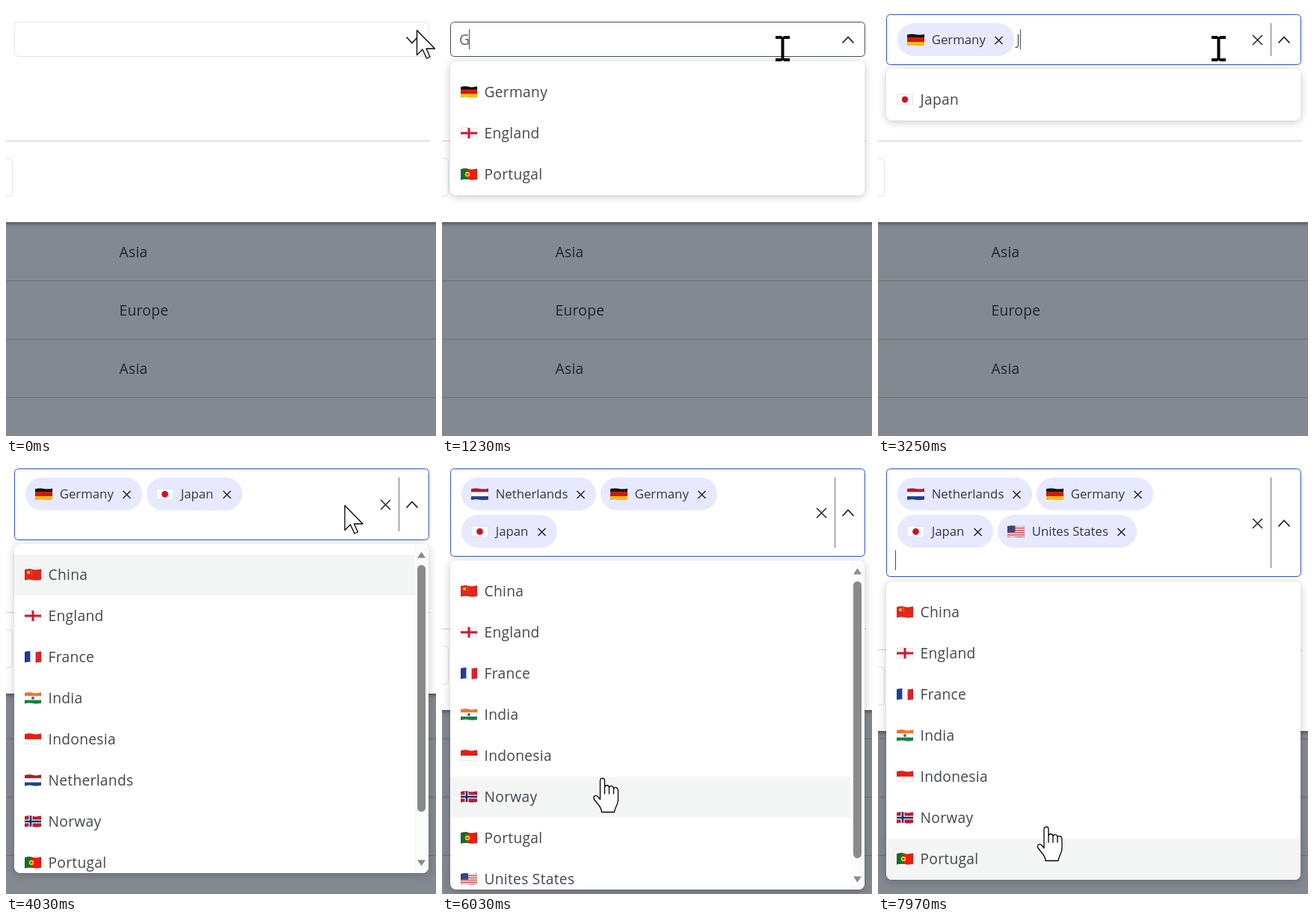
Write an HTML page that moves like this. It is 575x575 px and loops after 8000 ms.

```html
<!DOCTYPE html>
<html lang="en">
<head>
<meta charset="utf-8">
<title>Country multi-select</title>
<style>
  html, body { margin: 0; width: 100%; height: 100%; overflow: hidden; background: #848890; }
  svg { display: block; }
  text { font: 19.2px "Open Sans", sans-serif; letter-spacing: .3px; fill: #434651; }
  .page text { fill: #20242d; }
  .chip text { font-size: 16.8px; letter-spacing: 0; fill: #34353f; }
  text.typed { letter-spacing: 0; fill: #5c606d; }
  .modal { filter: drop-shadow(0 1px 3px rgba(0, 0, 0, .55)); }
  .menu { filter: drop-shadow(0 2px 6px rgba(0, 0, 0, .22)); }
  .icon { fill: none; stroke: #20222a; stroke-width: 1.5; }
  .pointer { fill: #fff; stroke: #000; stroke-width: 1.3; stroke-linejoin: round; }
</style>
</head>
<body>
<svg id="stage" viewBox="0 0 575 575" width="100%" height="100%">
  <defs id="flags"></defs>
  <g class="page" id="page"></g>
  <g id="view"></g>
  <rect id="caret" width="1" height="27" fill="#4a4d58"/>
  <g id="cursor">
    <path id="arrow" class="pointer" d="M.5 .5V33.5L8 26L13.5 38L18 36L13 25H24.5Z"/>
    <path id="beam" d="M-9.5 -17H-2L0 -15.5L2 -17H9.5V-13H2V13H9.5V17H2L0 15.5L-2 17H-9.5V13H-2V-13H-9.5Z"/>
    <path id="hand" class="pointer" d="M-3 28V3C-3 -1.5 3 -1.5 3 3V13C3 8 9 8 9 13C9 9 15 9 15 14.5C15 11 21 11 21 17V28C21 36 17 37 16 45H-1C-1 38 -6 35 -11 28C-13 24 -9 21 -6 24.5ZM3 12V21M9 13V21M15 14V21"/>
  </g>
</svg>
<script>
const LOOP = 8000, ROW = 55, PAD = 14, MAX_MENU = 440;
const $ = id => document.getElementById(id);
const rect = (x, y, w, h, fill, more = '') =>
  `<rect x="${x}" y="${y}" width="${w}" height="${h}" fill="${fill}" ${more}/>`;
const line = (x1, y1, x2, y2, color) =>
  `<path d="M${x1} ${y1}L${x2} ${y2}" stroke="${color}" fill="none"/>`;
const text = (x, y, s, cls = '') => `<text class="${cls}" x="${x}" y="${y}">${s}</text>`;
const dot = (x, y, r, fill) => `<circle cx="${x}" cy="${y}" r="${r}" fill="${fill}"/>`;
const cross = (x, y, r) =>
  `<path class="icon" d="M${x - r} ${y - r}l${2 * r} ${2 * r}m0 ${-2 * r}l${-2 * r} ${2 * r}"/>`;

// Flags on a 22 x 16 cloth
const bands = (...colors) => colors.map((c, i) =>
  rect(0, i * 16 / colors.length, 22, 16 / colors.length + .1, c)).join('');
const nordic = (color, w) => rect(8 - w / 2, 0, w, 16, color) + rect(0, 8 - w / 2, 22, w, color);
const stripes = Array.from({ length: 11 }, (_, i) => i % 2 ? '#f4f0f0' : '#cf3a45');
const flags = {
  China: bands('#e5251d') + dot(5, 5, 2, '#fbd022') + dot(9, 3, .7, '#fbd022') + dot(9.5, 7, .7, '#fbd022'),
  England: bands('#fafafa') + rect(9.5, 0, 3, 16, '#cf1730') + rect(0, 6.5, 22, 3, '#cf1730'),
  France: bands('#fafafa') + rect(0, 0, 7.4, 16, '#1f3d99') + rect(14.6, 0, 8, 16, '#e01e28'),
  Germany: bands('#15120f', '#d8150c', '#fcbc0a'),
  India: bands('#f2762b', '#fafafa', '#15833c') + dot(11, 8, 2, '#5a5f96'),
  Indonesia: bands('#e81e16', '#fafafa'),
  Japan: bands('#fafafa') + dot(11, 8, 4.2, '#d30c25'),
  Netherlands: bands('#b01c2b', '#fafafa', '#22418c'),
  Norway: bands('#c21930') + nordic('#fafafa', 5) + nordic('#15306b', 2.5),
  Portugal: bands('#e81e10') + rect(0, 0, 9, 16, '#10702c') + dot(9, 8, 3.2, '#f7d21e') + dot(9, 8, 1.6, '#d8281c'),
  'Unites States': bands(...stripes) + rect(0, 0, 10, 8.7, '#3c4478')
};
const countries = Object.keys(flags);
const cloth = 'M0 1.2Q6 -.3 11 .9T22 .6V14.8Q16 16.2 11 15T0 15.4Z';
const flagId = name => 'flag-' + countries.indexOf(name);
const flag = (name, x, y, w) =>
  `<use href="#${flagId(name)}" x="${x}" y="${y}" width="${w}" height="${w * 16 / 22}"/>`;
$('flags').innerHTML = `<clipPath id="cloth"><path d="${cloth}"/></clipPath>` +
  countries.map(name => `<symbol id="${flagId(name)}" viewBox="0 0 22 16">
    <g clip-path="url(#cloth)">${flags[name]}<path d="${cloth}" fill="none" stroke="#0002"/></g></symbol>`).join('');

$('page').innerHTML = rect(0, 0, 575, 575, '#848890') +
  [367.5, 445.5, 523.5].map(y => line(0, y, 575, y, '#6c7078')).join('') +
  ['Asia', 'Europe', 'Asia'].map((s, i) => text(151.5, 336 + i * 78, s)).join('');

// Field top and bottom for 0..4 chosen countries
const fields = [[21, 68], [11, 79], [6, 102], [6, 124], [6, 151]];
const chipWidth = { Germany: 156, Japan: 128, Netherlands: 180, 'Unites States': 186 };
const one = ['Germany'], two = ['Germany', 'Japan'];
const three = ['Netherlands', ...two], four = [...three, 'Unites States'];
const states = [
  { t: 0, closed: true, border: '#e3e3e7' },
  { t: 460, border: '#464b57' },
  { t: 1230, typed: 'G', found: ['Germany', 'England', 'Portugal'], border: '#464b57' },
  { t: 1390, typed: 'Ge', found: one, border: '#464b57' },
  { t: 1465, typed: 'Ger', found: one, border: '#464b57' },
  { t: 1540, typed: 'Germ', found: one, border: '#464b57' },
  { t: 2240, chips: one, active: 0 },
  { t: 3250, chips: one, typed: 'J', found: ['Japan'] },
  { t: 3400, chips: one, typed: 'Ja', found: ['Japan'] },
  { t: 3950, chips: two, active: 0 },
  { t: 5650, chips: three },
  { t: 6340, chips: three, scroll: 14 },
  { t: 7270, chips: four }
].map(s => {
  const chips = s.chips || [];
  const [top, bottom] = fields[chips.length];
  const items = s.found || countries.filter(c => !chips.includes(c));
  return { scroll: 0, active: -1, typed: '', border: '#2c4fce', ...s, chips, top, bottom, items,
    menuTop: bottom + (chips.length && chips.length < 4 ? 5 : 6) };
});

// Visible caret: from, to, x, y
const carets = [
  [480, 1010, 23, 31], [1230, 1390, 36, 31], [1390, 1465, 47, 31], [1465, 1540, 55, 31],
  [1540, 2090, 73, 31], [2560, 3100, 185, 31], [3250, 3400, 190, 31], [3400, 3930, 200, 31],
  [4490, 5020, 23, 65], [5480, 5650, 23, 65], [5650, 6030, 157, 76], [6580, 7110, 157, 76],
  [7590, 8000, 23, 115]
];

// Pointer path: time, x, y
const path = [
  [0, 549, 32], [80, 549, 32], [270, 505, 31], [690, 455.5, 57], [4020, 455.5, 57],
  [4030, 452.5, 55], [4680, 452.5, 55], [5480, 214.5, 420.5], [6760, 214.5, 420.5],
  [6950, 168.5, 519], [7200, 200, 538], [7430, 224, 532], [7960, 224, 532], [7970, 225, 485.5], [8000, 225, 485.5]
];
function pointerAt(t) {
  const i = Math.max(1, path.findIndex(p => p[0] > t));
  const [t0, x0, y0] = path[i - 1], [t1, x1, y1] = path[i];
  const k = (t - t0) / (t1 - t0), ease = k * k * (3 - 2 * k);
  return { x: x0 + (x1 - x0) * ease, y: y0 + (y1 - y0) * ease };
}
const stateAt = t => states.findLast(s => s.t <= t);
const shapeAt = (t, y) => t < 160 ? 'arrow' : t < 4030 ? 'beam' : y > 107 ? 'hand' : 'arrow';

function hovered(s, t) {
  const { y } = pointerAt(Math.max(0, t - 80));
  if (shapeAt(t, y) !== 'hand') return s.active;
  return Math.min(s.items.length - 1, Math.floor((y - s.menuTop - PAD + s.scroll) / ROW));
}

function drawModal(s) {
  const rule = Math.max(180, s.bottom + (s.chips.length === 4 ? 97 : 96)) + .5;
  return rect(-20, -20, 615, rule + 128.5, '#fff', 'class="modal"') +
    line(0, rule, 567, rule, '#cbccd0') +
    rect(-50, rule + 23, 58.5, 51, '#fff', 'rx="5" stroke="#e3e3e7"');
}

function drawField(s) {
  const { top, bottom, chips } = s, mid = Math.round((top + bottom) / 2);
  let x = 26, y = chips.length === 1 ? 23 : 18;
  let out = rect(11.5, top + .5, 554, bottom - top - 1, '#fff', `rx="5" stroke="${s.border}"`);
  for (const name of chips) {
    const w = chipWidth[name];
    if (x + w > 480) { x = 26; y += 50; }
    out += `<g class="chip">${rect(x, y, w, 44, '#e6e9ff', 'rx="22"')}` +
      flag(name, x + 13, y + 14, 23) + text(x + 45.7, y + 28, name) + cross(x + w - 20.5, y + 23, 5) + '</g>';
    x += w + 6;
  }
  if (chips.length) out += cross(507.5, mid + .5, 6.5) + line(525.5, top + 12, 525.5, bottom - 12, '#6b6e76');
  if (s.typed) out += text(chips.length ? 185 : 23, 52, s.typed, 'typed');
  const dy = s.closed ? 4 : -4;
  return out + `<path class="icon" style="stroke-width:1.8" d="M535.5 ${mid + .5 - dy}l7.5 ${2 * dy}l7.5 ${-2 * dy}"/>`;
}

function drawMenu(s, active) {
  const full = PAD + s.items.length * ROW, h = Math.min(full, MAX_MENU), top = s.menuTop;
  const scrolls = full > h;
  const box = more => rect(11, top, 554, h, '#fff', `rx="8" ${more}`);
  let out = box('class="menu"') + `<clipPath id="menu-clip">${box('')}</clipPath><g clip-path="url(#menu-clip)">`;
  s.items.forEach((name, i) => {
    const y = top + PAD - s.scroll + i * ROW;
    if (i === active) out += rect(11, y, scrolls ? 536 : 554, ROW, '#f4f5f5');
    out += flag(name, 25, y + 19, 22) + text(56.5, y + 34, name);
  });
  if (scrolls) {
    const track = h - 58, thumb = track * h / full;
    out += rect(547, top, 18, h, '#fbfbfb') +
      `<path fill="#8a8a8a" d="M550 ${top + 18.5}h11l-5.5 -8zM550 ${top + 422.5}h11l-5.5 8z"/>` +
      rect(550, top + 28 + track * s.scroll / full, 11, thumb, '#8a8a8a', 'rx="5.5"');
  }
  return out + '</g>';
}

let shown = '';
function frame(now) {
  const t = now % LOOP, s = stateAt(t), active = hovered(s, t);
  const key = s.t + ':' + active;
  if (key !== shown) {
    $('view').innerHTML = drawModal(s) + drawField(s) + (s.closed ? '' : drawMenu(s, active));
    shown = key;
  }
  const caret = carets.find(([from, to]) => t >= from && t < to);
  $('caret').style.display = caret ? '' : 'none';
  if (caret) {
    $('caret').setAttribute('x', caret[2]);
    $('caret').setAttribute('y', caret[3]);
  }
  const { x, y } = pointerAt(t), shape = shapeAt(t, y);
  for (const id of ['arrow', 'beam', 'hand']) $(id).style.display = id === shape ? '' : 'none';
  $('cursor').setAttribute('transform', `translate(${x} ${y})`);
}

const start = performance.now();
(function tick() {
  frame(performance.now() - start);
  requestAnimationFrame(tick);
})();
</script>
</body>
</html>
```
